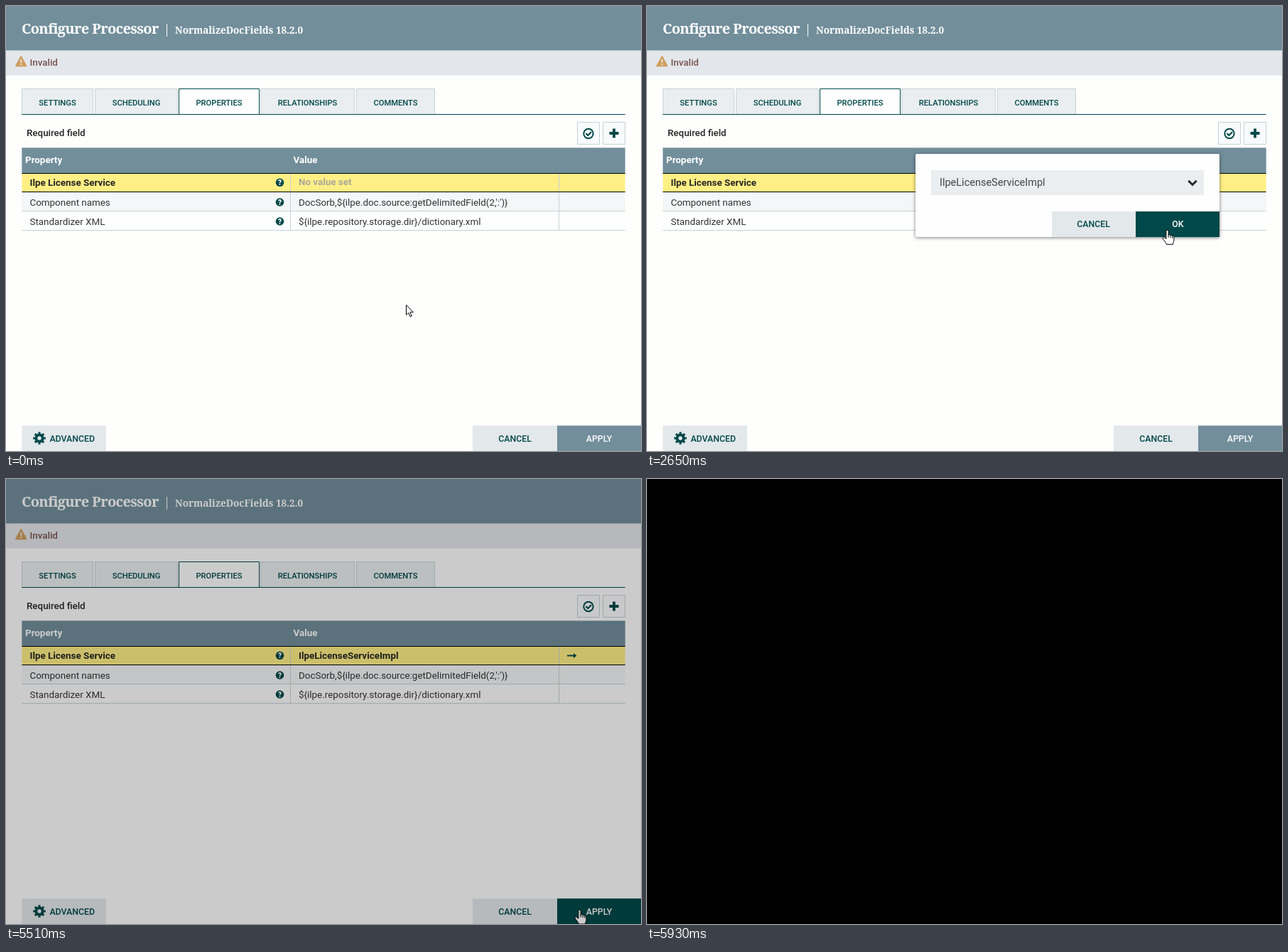
Write an HTML page that moves like this. It is 894 by 626 pixels and loops after 6.37 s.

```html
<!DOCTYPE html>
<html lang="en">
<head>
<meta charset="utf-8">
<title>Configure Processor</title>
<style>
  html, body { margin: 0; width: 100%; height: 100%; overflow: hidden; background: #fefefd; }
  svg { display: block; }
  text { font: 13.4px Roboto, Arial, sans-serif; fill: #333; white-space: pre; }
  .title { font: bold 20px "Noto Serif", serif; letter-spacing: -.67px; fill: #fff; }
  .sub { font: 600 13.5px "Noto Serif", serif; fill: #fff; }
  .bold { font-weight: bold; fill: #262626; }
  .medium { font-weight: 500; fill: #262626; }
  .tab { font-size: 11.2px; font-weight: 500; fill: #004849; text-anchor: middle; }
  .btn { font-size: 12.3px; font-weight: 500; fill: #004849; text-anchor: middle; }
  .white { fill: #fff; }
  .mark { font-size: 10px; font-weight: 900; text-anchor: middle; }
  .combo { font-size: 14.5px; fill: #444; }
  .tip { font: 12.6px "Open Sans", sans-serif; letter-spacing: -.2px; fill: #575757; }
  .slate { fill: #728e9b; }
  .pale { fill: #e3e8eb; }
  .dark { fill: #004849; }
  .line { fill: none; stroke: #c7d2d7; }
  .ink { fill: none; stroke: #004849; }
</style>
</head>
<body>
<svg width="894" height="626" viewBox="0 0 894 626">
  <rect width="894" height="626" fill="#fefefd"/>

  <rect y="62" width="894" height="35.7" fill="#e3e6eb"/>
  <rect class="slate" width="894" height="62.5"/>
  <text class="title" x="22" y="39">Configure Processor</text>
  <path d="M226.5 25V43" stroke="#fff"/>
  <text class="sub" x="238" y="39">NormalizeDocFields 18.2.0</text>

  <path d="M21.2 71.2L28.3 84.3H14.1Z" fill="#cf9f5d" stroke="#cf9f5d" stroke-width="2" stroke-linejoin="round"/>
  <path d="M21.2 75V79.8M21.2 81.2V83.2" stroke="#e3e6eb" stroke-width="2"/>
  <text class="medium" x="33.5" y="84" style="fill:#775351">Invalid</text>

  <g id="tabs"></g>
  <path class="ink" d="M22.3 152.5H871.7"/>

  <text class="medium" x="29" y="183">Required field</text>
  <path d="M804.5 163.5h31v31h-31zM840.5 163.5h31v31h-31z" fill="#f9fafb" stroke="#c7d2d7"/>
  <circle class="ink" cx="820" cy="179.5" r="6.7" stroke-width="2"/>
  <path class="ink" d="M816.5 179.3L819.3 182L824 177.2" stroke-width="2.2"/>
  <path class="ink" d="M849.5 179H862.5M856 172.5V185.5" stroke-width="3.8"/>

  <rect class="slate" x="22.3" y="199.4" width="849.4" height="36.6"/>
  <text class="bold white" x="27" y="221">Property</text>
  <text class="bold white" x="404.5" y="221">Value</text>
  <rect x="22.3" y="236" width="849.4" height="25" fill="#ffef85"/>
  <rect id="row2" x="22.3" y="262" width="849.4" height="26"/>
  <rect id="row3" x="22.3" y="289" width="849.4" height="26"/>
  <path class="line" d="M22.3 288.5H871.7M22.3 315.5H871.7M400.5 236V315M778.5 236V315"/>
  <path d="M22.3 235.5H871.7M22.3 261.5H871.7" stroke="#000"/>
  <text class="bold" x="33.5" y="253">Ilpe License Service</text>
  <text x="33.5" y="281">Component names</text>
  <text x="33.5" y="308">Standardizer XML</text>
  <g id="help"></g>
  <text id="unset" class="bold" x="412" y="252" style="fill:#a9a899">No value set</text>
  <g id="assigned">
    <text class="bold" x="412" y="253">IlpeLicenseServiceImpl</text>
    <path class="ink" d="M790 248.5H801" stroke-width="2"/>
    <path class="dark" d="M799 245L803.5 248.5L799 252Z"/>
  </g>
  <text x="412" y="281">DocSorb,${ilpe.doc.source:getDelimitedField(2,':')}</text>
  <text x="412" y="308">${ilpe.repository.storage.dir}/dictionary.xml</text>

  <rect class="pale" x="22.3" y="590.3" width="118.7" height="36"/>
  <circle class="ink" cx="47" cy="608" r="4.7" stroke-width="4"/>
  <circle class="ink" cx="47" cy="608" r="7.3" stroke-width="3" pathLength="16" stroke-dasharray="1" stroke-dashoffset=".5"/>
  <text class="btn" x="93.2" y="613">ADVANCED</text>
  <rect class="pale" x="657" y="590.3" width="119" height="36"/>
  <text class="btn" x="716.5" y="612.5">CANCEL</text>
  <rect class="slate" x="776" y="590.3" width="118" height="36"/>
  <rect id="apply" class="dark" x="776" y="590.3" width="118" height="36"/>
  <text class="btn white" x="835" y="612.5">APPLY</text>

  <g id="dialog">
    <rect x="378" y="208" width="428" height="117" rx="2" fill="#fefefe" style="filter:drop-shadow(0 1px 2.5px rgba(0,0,0,.5))"/>
    <rect x="400" y="231" width="384" height="35" fill="#eaeef0"/>
    <text class="combo" x="412" y="253">IlpeLicenseServiceImpl</text>
    <path d="M762.3 245.8L768 251.5L773.7 245.8" fill="none" stroke="#262626" stroke-width="3"/>
    <rect id="cancel" x="570" y="289" width="118" height="36"/>
    <text class="btn" x="628.5" y="311">CANCEL</text>
    <rect id="ok" x="688" y="289" width="118" height="36"/>
    <text class="btn bold white" x="747.3" y="311">OK</text>
  </g>
  <g id="tooltip">
    <rect x="561.5" y="266.5" width="147" height="24" fill="#fff" stroke="#999" style="filter:drop-shadow(2px 2px 1.5px rgba(0,0,0,.35))"/>
    <text class="tip" x="567" y="283">IlpeLicenseServiceImpl</text>
  </g>

  <g id="cursor" fill="#fff" stroke="#000" stroke-linejoin="round">
    <path id="arrow" d="M.5 .7V14.6L3.7 11.6L6 17L8.2 16L5.9 10.8H10.4Z"/>
    <g id="hand">
      <path d="M-1.6 12.2V1.6a1.6 1.6 0 0 1 3.2 0V7.2c.6-1 2.8-.8 2.9.6c.8-.8 2.6-.5 2.7.9c.9-.6 2.2-.1 2.2 1.3V14.5c0 2-1.4 3-1.4 5.5H-1.2c0-2-4-6-5.2-8.3c-.6-1.6 1.2-2.5 2.4-1.2Z"/>
      <path d="M1.6 7V10.5M4.5 8V11M7.2 9V11.5" fill="none"/>
    </g>
  </g>
  <rect id="fade" width="894" height="626" fill="#010102"/>
</svg>
<script>
const LOOP = 6370;
const $ = id => document.getElementById(id);
const show = (id, on) => $(id).style.display = on ? '' : 'none';
const fill = (id, color) => $(id).style.fill = color;

// Tabs: label, left, right
$('tabs').innerHTML = [
  ['SETTINGS', 22, 122], ['SCHEDULING', 125, 241], ['PROPERTIES', 243, 356],
  ['RELATIONSHIPS', 358, 490], ['COMMENTS', 493, 603]
].map(([label, l, r]) => {
  const style = label === 'PROPERTIES'
    ? 'fill="#fefefe" stroke="#004849"' : 'fill="#eaeef0" stroke="#c7d2d7"';
  return `<path d="M${l + .5} 152V116.5H${r + .5}V152" ${style}/>
    <text class="tab" x="${(l + r + 1) / 2}" y="139.5">${label}</text>`;
}).join('');

$('help').innerHTML = [248.3, 276, 303].map(y =>
  `<circle class="dark" cx="385.5" cy="${y}" r="5.8"/>
   <text class="mark white" x="385.5" y="${y + 3.6}">?</text>`).join('');

// Progress 0..1 in n even steps, the first at time a and the last at b
const steps = (t, a, b, n) => t < a ? 0 :
  Math.min(1, (Math.floor((t - a) / (b - a) * (n - 1) + .2) + 1) / n);
const ease = p => p * p * (3 - 2 * p);

const start = [563, 420];
const moves = [
  { to: [552.5, 250.5], a: 240, b: 860, n: 19 },
  { to: [732.5, 315.3], a: 2170, b: 2650, n: 15 },
  { to: [807.5, 606], a: 4030, b: 4650, n: 19 }
];

function pointer(t) {
  let [x, y] = start;
  for (const { to, a, b, n } of moves) {
    const p = ease(steps(t, a, b, n));
    x += (to[0] - x) * p;
    y += (to[1] - y) * p;
  }
  return [x, y];
}

function draw(t) {
  const [x, y] = pointer(t);
  const within = (l, top, r, bottom) => x >= l && x < r && y >= top && y < bottom;
  const open = t >= 1340 && t < 3310;
  const done = t >= 3310;
  const onApply = t >= 4680;
  const onCombo = open && within(400, 231, 784, 266);
  const onCancel = open && within(570, 289, 688, 325);
  const onOk = open && within(688, 289, 806, 325);
  const onValue = !open && within(401, 236, 778, 316);

  fill('row2', !open && within(22, 262, 872, 289) ? '#e3e8eb' : '#f4f6f7');
  fill('row3', !open && within(22, 289, 872, 316) ? '#e3e8eb' : '#fefefe');
  show('unset', !done);
  show('assigned', done);
  show('dialog', open);
  fill('cancel', onCancel ? '#c7d2d7' : '#e3e8eb');
  fill('ok', onOk ? '#004849' : '#728e9b');
  show('tooltip', t >= 1930 && onCombo);
  $('apply').style.opacity = steps(t, 4680, 4820, 4);

  const hand = onCombo || onCancel || onOk || onValue || onApply;
  show('hand', hand);
  show('arrow', !hand);
  $('cursor').setAttribute('transform', `translate(${x} ${y})`);
  $('fade').style.opacity = steps(t, 5440, 5930, 15);
}

const origin = performance.now();
function tick() {
  draw((performance.now() - origin) % LOOP);
  requestAnimationFrame(tick);
}
tick();
</script>
</body>
</html>
```
